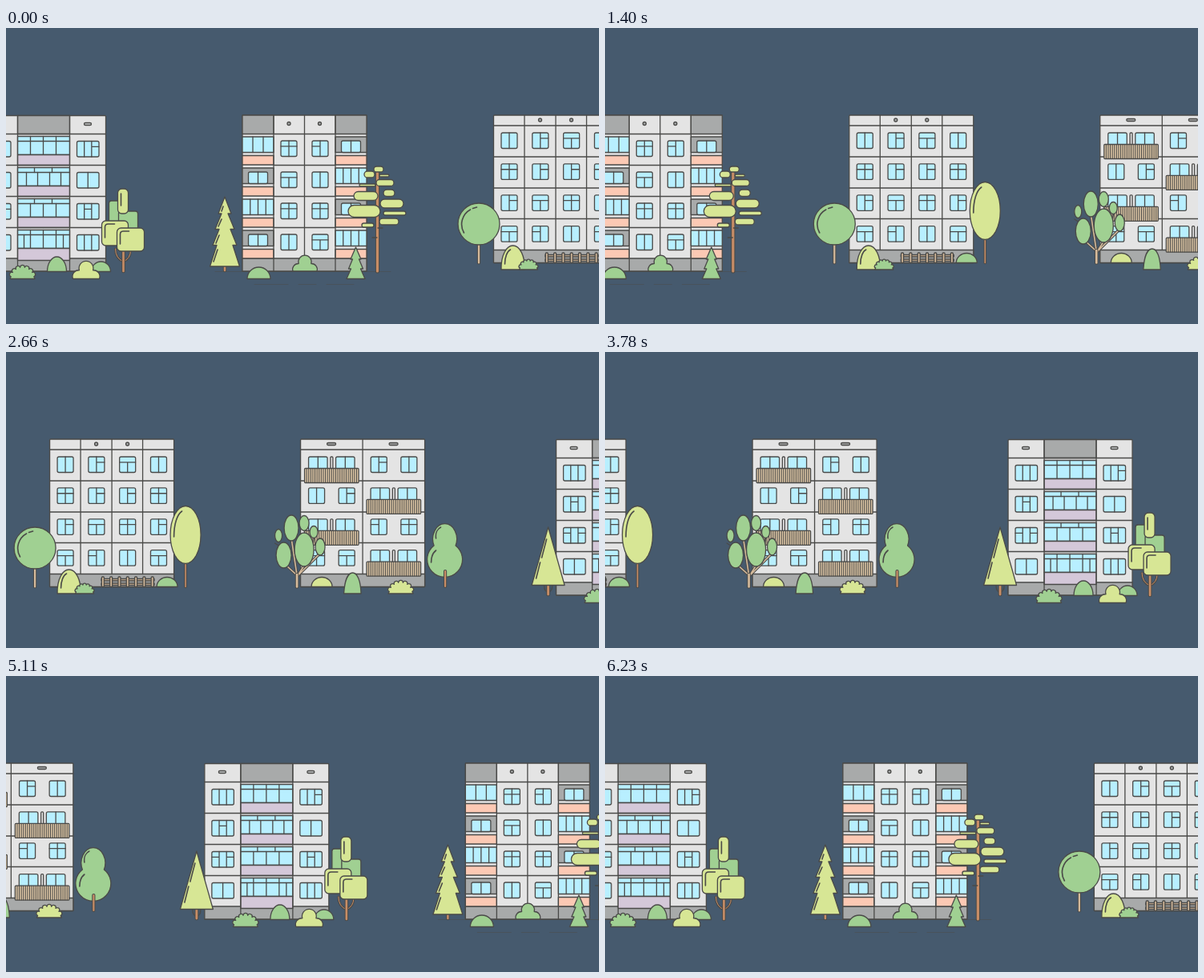
Animation, 740 px wide and 370 px high, one loop 6.3 s. Source, as an HTML page:

```html
<!DOCTYPE html>
<html lang="en">
<head>
<meta charset="utf-8">
<title>Street of apartment blocks</title>
<style>
  html, body { margin: 0; width: 100%; height: 100%; overflow: hidden; background: #465a6e; }
  svg { display: block; }
</style>
</head>
<body>
<svg id="stage" width="740" height="370" viewBox="0 0 740 370"></svg>
<script>
const WALL = '#e4e4e4', GRAY = '#a8aaaa', GLASS = '#b8efff', ORANGE = '#fcc9b4', LILAC = '#d4c8d9',
      GREEN = '#a0d092', LIME = '#d7e695', BROWN = '#c78d66', TAN = '#d6bb9c', INK = '#4a4a48';
const LOOP = 6300, STEP = 70, PERIOD = 1271;
const STOPS = [0, 314.5, 625.5, 943.5, PERIOD];

// Shape helpers, all returning SVG markup
const rect = (x, y, w, h, fill, r = 0) =>
  `<rect x="${x}" y="${y}" width="${w}" height="${h}" rx="${r}" fill="${fill}"/>`;
const path = (d, fill = 'none') => `<path d="${d}" fill="${fill}"/>`;
const ellipse = (x, y, rx, ry, fill) => `<ellipse cx="${x}" cy="${y}" rx="${rx}" ry="${ry}" fill="${fill}"/>`;
const each = (list, fn) => list.map(fn).join('');
const verticals = (xs, y, h) => path(each(xs, x => `M${x} ${y}v${h}`));
const stem = (d, color, w) =>
  `<path d="${d}" fill="none" stroke-width="${w + 2}"/><path d="${d}" fill="none" stroke="${color}" stroke-width="${w}"/>`;
const faint = d => `<path d="${d}" fill="none" stroke-width="1" opacity=".5"/>`;
const shine = d => `<path d="${d}" fill="none" stroke-width="1.6"/>`;

// kind: pane count followed by the panes with a crossbar, or "t"
function win(x, y, kind, w = 20, h = 19.5) {
  const bar = y + h * .35;
  let d = '';
  if (kind === 't') d = `M${x} ${bar}h${w}M${x + w / 2} ${bar}V${y + h}`;
  else {
    const [n, ...bars] = [...kind].map(Number), pane = w / n;
    for (let i = 1; i < n; i++) d += `M${x + i * pane} ${y}v${h}`;
    for (const i of bars) d += `M${x + i * pane} ${bar}h${pane}`;
  }
  return rect(x, y, w, h, GLASS, 2) + path(d);
}

const dome = (x, w, top, base, fill) =>
  path(`M${x} ${base}A${w / 2} ${base - top} 0 0 1 ${x + w} ${base}z`, fill);

function scallop(x, w, top, base, fill) {
  const r = w * .085;
  let d = `M${x} ${base}`;
  for (let i = 0; i <= 7; i++) {
    const a = Math.PI * (.06 + .88 * i / 7);
    d += `${i ? `A${r} ${r} 0 0 1` : 'L'} ${x + w / 2 - Math.cos(a) * w * .47} ${base - Math.sin(a) * (base - top - 1)}`;
  }
  return path(`${d}L${x + w} ${base}z`, fill);
}

function cloud(x, w, top, base, fill) {
  const side = .24 * w, y = base - .5 * (base - top), r = .27 * w;
  return path(`M${x} ${base}A${side} ${side} 0 0 1 ${x + side} ${y}A${r} ${r} 0 1 1 ${x + w - side} ${y}` +
    `A${side} ${side} 0 0 1 ${x + w} ${base}z`, fill);
}

function orangeBlock() {
  const kinds = [['201', '20'], ['t', '2'], ['201', '201'], ['2', 't']];
  const side = (x, f, panes) => {
    const y = 136 + f * 39, cuts = [1, 2, 3].slice(0, panes - 1).map(i => x + i * 39 / panes);
    return rect(x, y, 39, 19.5, panes ? GLASS : GRAY) +
      (panes ? verticals(cuts, y, 19.5) : win(x + 7.5, y + 5, '2', 24, 14.5)) +
      rect(x, y + 23.5, 39, 11.5, ORANGE);
  };
  const pads = [[164, 173, 12, 7], [152, 179, 13, 8], [171, 183, 12, 3], [167, 189.5, 22, 8], [146, 195, 20, 3],
    [139, 204.5, 30, 11], [176, 202, 14, 8.5], [172, 214, 29, 11], [132, 221.5, 40, 15], [176, 229, 28, 5],
    [171, 238, 24, 8], [149, 244, 15, 5]];
  return faint('M-34 304.5H185M15 320.5h42M70 320.5h22M105 320.5h34') +
    rect(0, 109, 155, 195, WALL, 1) + rect(0, 109, 39, 23.5, GRAY) + rect(116, 109, 39, 23.5, GRAY) +
    rect(0, 288, 155, 16, GRAY) +
    each(kinds, (row, f) => side(0, f, [3, 0, 4, 0][f]) + side(116, f, f % 2 * 4) +
      path(`M39 ${132.5 + f * 39}H116`) +
      each(row, (k, i) => win(48 + i * 39, 141 + f * 39, k))) +
    verticals([39, 77.5, 116], 109, 195) +
    ellipse(58, 119.5, 2, 2, GRAY) + ellipse(96.5, 119.5, 2, 2, GRAY) +
    stem('M-22 298V303', BROWN, 2.5) +
    path('M-22 211L-14 232H-18L-10 251.500H-15L-7 271.500H-12L-3.500 298H-40.500L-32 271.500H-37L-29 251.500H-34L-26 232H-30z', LIME) +
    shine('M-24 223l-2 6M-26 239l-4 9M-29 259l-4 10M-31 277l-5 15') +
    stem('M168.5 180V304', BROWN, 3.2) + path('M168 262h-6M169 250h6M168 212h-8') +
    each(pads, ([x, y, w, h]) => rect(x, y, w, h, LIME, h / 2)) +
    dome(6, 29, 299, 313.5, GREEN) + cloud(63, 30, 285, 304, GREEN) +
    path('M141.5 274L148 289H145.5L150.5 301H147.5L153 313.5H130L135.5 301H132.5L137.5 289H135z', GREEN);
}

function plainShell(columns) {
  return rect(0, 109, 155, 184.5, WALL, 1) + rect(0, 277.5, 155, 16, GRAY) +
    path('M0 122H155M0 161H155M0 200H155M0 238.5H155') + verticals(columns, 109, 168.5);
}

function fencedBlock() {
  const kinds = [['2', '21', 't', '2'], ['201', '21', '21', '201'], ['21', 't', '201', '21'], ['t', '20', '2', 't']];
  return plainShell([38.5, 77.5, 116]) +
    each(kinds, (row, f) => each(row, (k, i) => win(9.5 + i * 38.8, 131 + f * 38.9, k))) +
    ellipse(58, 115, 2, 2, GRAY) + ellipse(97, 115, 2, 2, GRAY) +
    stem('M-18.5 270V293.5', TAN, 2.2) + ellipse(-18.5, 245, 26, 26, GREEN) +
    shine('M-37 256A21 21 0 0 1 -29 227M-26 225.500l5 -1.500') +
    rect(64.5, 283.5, 66, 2.5, TAN) + rect(64.5, 289, 66, 2.5, TAN) +
    each([0, 1, 2, 3, 4, 5, 6], i => rect(64.8 + i * 10.3, 281, 3, 12.5, TAN, 1)) +
    path('M9.5 302C9 284 16 272 24 272C33 272 39 285 39 302z', LIME) + shine('M14 295C14 286 17 279 21 277') +
    scallop(32, 23, 290, 302, GREEN) + dome(133.5, 26, 281.5, 293.5, GREEN) +
    stem('M169.5 264V293.5', BROWN, 1.6) + ellipse(169.5, 228.5, 19, 36, LIME) +
    shine('M155 231C155 215 159 203 165 199');
}

function balcony(x, y) {
  const slats = Array.from({ length: 25 }, (_, i) => x + (i + 1) * 67.5 / 26);
  return win(x + 5, y, '2', 23.5, 17) + win(x + 39, y, '2', 23.5, 17) + rect(x + 32.3, y, 3, 17, WALL, 1) +
    rect(x, y + 14.5, 67.5, 18, '#dcc5a4', 1) +
    `<g stroke-width="1">${verticals(slats, y + 14.5, 18)}</g>`;
}

function balconyBlock() {
  const kinds = [['21', '2'], ['2', '21'], ['20', '201'], ['t', 't']];
  const leaves = [[-27.5, 229.5, 4.5, 8], [-11.5, 220, 9, 16], [4.5, 214, 6, 9.5], [16.5, 225, 5, 7.5],
    [-21, 254, 9.5, 16], [4.5, 247, 12, 21], [24.5, 243.5, 6, 10.5]];
  return plainShell([77.5]) +
    each(kinds, (row, f) => {
      const y = 131 + f * 38.9, left = f % 2 === 0;
      return balcony(left ? 5 : 82.5, y) + each(row, (k, i) => win((left ? 87.7 : 10) + i * 37.6, y, k));
    }) +
    rect(33, 113.5, 11, 3, GRAY, 1.5) + rect(110.5, 113.5, 11, 3, GRAY, 1.5) +
    stem('M-4.5 279L-21 264M-4.5 279L-11 236M-4.5 281L5 266M-3 279L24 252', TAN, 1.6) +
    stem('M-4.5 293.5V278', TAN, 2.6) +
    path('M-21 246L-32 239M4 268L5 222M12 264L17 231') +
    each(leaves, e => ellipse(...e, GREEN)) +
    dome(13.5, 26, 281.5, 293.5, LIME) +
    path('M54 302C55 286 59 276 65 276C71 276 75 286 75.5 302z', GREEN) +
    scallop(109.5, 31, 287, 302, LIME) +
    path('M166.5 242A15 19 0 1 1 193.5 242A22 22 0 1 1 166.5 242z', GREEN) +
    shine('M169 233C168 226 171 221 175 219M163 263C163 255 165 251 169 248') +
    stem('M180.5 274V293', BROWN, 2.2);
}

function lilacBlock() {
  const kinds = [['3', '32'], ['31', '2'], ['302', '31'], ['2', '3']];
  const thirds = [61, 77, 93];
  const lower = [thirds, [56, 70, 85, 99], thirds, [53, 61, 77, 93, 102]];
  const upper = [thirds, [66, 88], [66, 88], thirds];
  return rect(0, 109.5, 155, 194.5, WALL, 1) + rect(0, 288, 155, 16, GRAY) + rect(45, 109.5, 65, 23, GRAY) +
    each(kinds, (row, f) => {
      const y = 135.5 + f * 39;
      return path(`M0 ${y - 3}H155`) + rect(45, y, 65, 23, GLASS) + path(`M45 ${y + 6}h65`) +
        verticals(upper[f], y, 6) + verticals(lower[f], y + 6, 17) +
        rect(45, y + 23, 65, f === 3 ? 15 : 13, LILAC) +
        each(row, (k, i) => win(9 + i * 110, y + 6, k, 27.5));
    }) +
    verticals([45, 110], 109.5, 194.5) +
    rect(17.5, 118.3, 9, 3.4, GRAY, 1.7) + rect(128, 118.3, 9, 3.4, GRAY, 1.7) +
    path('M-15 292Q-15 300 -10 300Q-5 300 -5 292') + stem('M-10 291V303', BROWN, 2.8) +
    path('M-10 219L10.5 291.5H-30.5z', LIME) + shine('M-12 234L-18 257M-20 263L-25 283') +
    scallop(35.5, 31, 298, 313.5, GREEN) + dome(82, 24, 286, 304.5, GREEN) +
    dome(137, 24, 292, 304.5, GREEN) + cloud(114, 33, 292, 313.5, LIME) +
    stem('M177 292Q167 288 167 276M177 292Q186 288 186 278', BROWN, 1) + stem('M177 304V278', BROWN, 2.6) +
    rect(159, 216, 14, 40, GREEN, 3) + rect(171, 229, 24, 34, GREEN, 3) +
    rect(170, 201, 13, 31, LIME, 5) + rect(150, 241, 33, 31, LIME, 5) + rect(169, 250, 34, 29, LIME, 5) +
    shine('M174 207V222M154 262V249Q154 245 158 245H166M173 270V258Q173 254 177 254H184');
}

const blocks = [[295, orangeBlock], [608.5, fencedBlock], [921.5, balconyBlock], [1240.5, lilacBlock]];
const stage = document.getElementById('stage');
stage.innerHTML = `<g id="world"><g id="street" stroke="${INK}" stroke-width="1.3" stroke-linejoin="round" stroke-linecap="round">` +
  each(blocks, ([x, draw]) => `<g transform="translate(${x})">${draw()}</g>`) +
  `</g><use href="#street" x="${-PERIOD}"/><use href="#street" x="${PERIOD}"/></g>`;
const world = document.getElementById('world');

// Four equal eased moves, one per block, advancing in 70 ms steps
function scrollAt(ms) {
  const phase = ms / LOOP * 4, leg = Math.floor(phase), u = phase - leg;
  return STOPS[leg] + (STOPS[leg + 1] - STOPS[leg]) * u * u * (3 - 2 * u);
}

function frame(now) {
  const ms = Math.floor((now + 12) / STEP) * STEP % LOOP;
  world.setAttribute('transform', `translate(${-scrollAt(ms)})`);
  requestAnimationFrame(frame);
}
frame(0);
</script>
</body>
</html>
```
